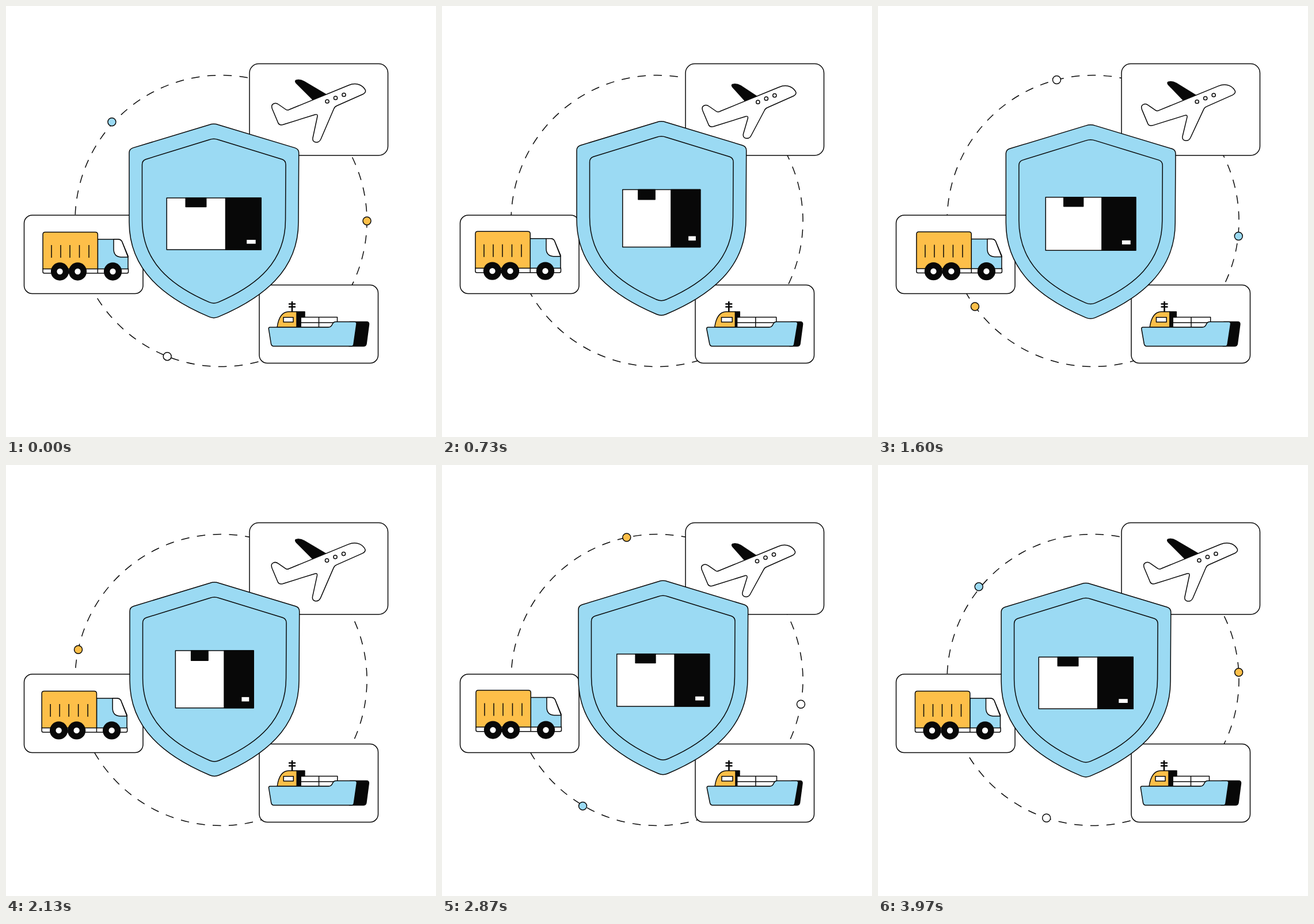
Write an HTML page that moves like this. It is 747 px wide and 750 px high and loops after 4010 ms.

```html
<!DOCTYPE html>
<html lang="en">
<head>
<meta charset="utf-8">
<title>Shipping protection</title>
<style>
html, body { margin: 0; width: 100%; height: 100%; overflow: hidden; background: #fff; }
svg { display: block; width: 747px; height: 750px; }
svg * { vector-effect: non-scaling-stroke; }
.line { fill: none; stroke: #080808; stroke-width: 1.5; stroke-linejoin: round; }
.white { fill: #fff; }
.blue { fill: #9bdaf3; }
.gold { fill: #fdbf49; }
.ink { fill: #080808; }
</style>
</head>
<body>
<svg viewBox="0 0 747 750">
  <circle id="ring" class="line" cx="373.5" cy="374" r="253.5" pathLength="57" stroke-dasharray=".52 .48"/>
  <g class="line">
    <circle id="goldDot" class="gold" r="7"/>
    <circle id="whiteDot" class="white" r="7"/>
    <circle id="blueDot" class="blue" r="7"/>
  </g>

  <g class="line">
    <rect class="white" x="423" y="100.5" width="240.5" height="159.5" rx="16"/>
    <rect class="white" x="31.5" y="364" width="206.5" height="136.5" rx="14"/>
    <rect class="white" x="440" y="485.5" width="206.5" height="136" rx="14"/>
  </g>

  <g id="plane" class="line">
    <path id="farWing" class="ink"/>
    <path id="fuselage" class="white"/>
    <g id="windows">
      <circle class="white" cx="558" cy="166" r="3.1"/>
      <circle class="white" cx="572.5" cy="160" r="3.1"/>
      <circle class="white" cx="587" cy="154.5" r="3.1"/>
    </g>
  </g>

  <g id="truck" class="line">
    <g id="chassis"><rect class="white" x="64.5" y="456" width="148.5" height="9" rx="2.5"/><path d="M159.8 456V465"/></g>
    <g id="body">
      <path class="blue" d="M159.8 406H195Q200 406 202 410L212.5 435V457.5H159.8Z"/>
      <path class="white" d="M187.5 406H195Q200 406 202 410L212.5 437H200Q187.5 436 187.5 423Z"/>
      <path class="gold" d="M64.5 457.5V397.5Q64.5 393.5 68.5 393.5H155.5Q159.8 393.5 159.8 397.5V457.5Z"/>
      <path d="M79.5 416V438M95.5 416V438M111.5 416V438M128 416V438M144.5 416V438"/>
    </g>
    <g id="wheels" class="white" style="stroke-width:10.5">
      <circle cx="94" cy="462" r="10.4"/>
      <circle cx="125" cy="462" r="10.4"/>
      <circle cx="186" cy="462" r="10.4"/>
    </g>
  </g>

  <g class="line">
    <path id="cargo" class="white"/>
    <path id="funnel" class="ink"/>
    <path id="cabin" class="gold"/>
    <path id="cabinWindow" class="white"/>
    <path id="mast" style="stroke-width:2.6"/>
    <path id="bow" class="ink"/>
    <path id="hull" class="blue"/>
  </g>

  <g id="shield" class="line">
    <path class="blue" d="M214 376V256Q214 249 220.5 247L353 206.8Q361 204 369 206.8L502 247Q508.700 249 508.700 256L508 376C508 460 447 508 369 541Q361 544.500 353 541C275 508 214 460 214 376Z"/>
    <path d="M236.500 372V276Q236.500 269 243 266.800L353 232.800Q361 229.800 369 232.800L479.500 266.800Q486 269 486 276L485.500 372C485.500 445 437 486 369 515.500Q361 519 353 515.500C285 486 236.500 445 236.500 372Z"/>
  </g>
  <g id="box" class="line">
    <rect class="white" x="-82" y="-90" width="164" height="90"/>
    <rect class="ink" x="20.300" y="-90" width="61.700" height="90"/>
    <rect class="ink" x="-49" y="-90" width="35.500" height="15.500"/>
    <rect class="white" x="57" y="-17" width="15.500" height="6.800" stroke="none"/>
  </g>
</svg>
<script>
const LOOP = 4010, TAU = Math.PI * 2;
const el = {};
document.querySelectorAll('[id]').forEach(n => el[n.id] = n);

const put = (id, x, y, extra = '') => el[id].setAttribute('transform', `translate(${x} ${y})${extra}`);
const draw = (id, d) => el[id].setAttribute('d', d);
const cubic = x => x < .5 ? 4 * x ** 3 : 1 - 4 * (1 - x) ** 3;

// [step, degrees] for the drift of the dashes
const drift = [[0, 0], [11, -2.3], [34, -2.3], [64, -4.1], [86, -4], [98, -6.9], [120, -6.316]];
function driftAt(k) {
  const i = drift.findIndex(d => d[0] > k);
  const [a, x] = drift[i - 1], [b, y] = drift[i];
  return x + (y - x) * (k - a) / (b - a);
}

function orbit(id, start, k, cx, cy, r) {
  const a = (start + 3 * k) * Math.PI / 180;
  put(id, cx + r * Math.cos(a), cy + r * Math.sin(a));
}

function drawPlane(p) {
  put('plane', -11.5 * p, 3.9 * p);
  put('windows', .5 * p, -2.5 * p);
  const x = 12.5 * p, y = 4.7 * p, up = 12 * p;
  draw('farWing', `M${533 + 4 * p} ${163 - p}L${504 + x} ${134 + y}Q${500.5 + x} ${129 + y} ${506 + x} ${128.7 + y}` +
    `Q${512 + x} ${128 + y} ${518 + x} ${131.500 + y}L${556 + p} 154Z`);
  draw('fuselage', `M462.500 179Q460 172 465 170Q469 168 473 171L486 180Q488.500 182 492 180.300L595 138` +
    `Q606 133.500 615 137.500Q622 141 624.500 147Q625 151 620 153.500L575 173.500Q571 175 569.500 179` +
    `L${547} ${231.500 - up}Q${544} ${238 - up} 538 ${237 - up}Q532 ${236 - up} 533 ${229.500 - up}` +
    `L541 192Q541.500 187.500 537 189L481 206.500Q475.500 208 473 204Z`);
}

function drawShip(p) {
  const m = (a, b) => a + (b - a) * p / .957;
  const l = m(456, 460), b = m(461, 466), c = m(604, 613), r = m(609, 619);
  const e = m(630.500, 626), f = m(626, 621.500), s = m(567, 576.500);
  draw('bow', `M${r - 12} 549.500H${e - 4}Q${e + .5} 549.500 ${e} 554L${f} 588Q${f - 1} 592 ${f - 5} 592H${c - 8}Z`);
  draw('hull', `M${l + 3} 559Q${l - .5} 559 ${l + .500} 563L${b - .500} 588Q${b + .500} 592 ${b + 4} 592` +
    `H${c - 4}Q${c - .500} 592 ${c} 588L${r} 553Q${r} 549.500 ${r - 3} 549.500H${s + 6}` +
    `Q${s + 2} 549.500 ${s} 553.500Q${s - 2} 559 ${s - 7} 559Z`);

  const w = m(471, 474), k = m(505, 510), t = m(519, 517), v = m(512, 512.500);
  draw('cabin', `M${w} 559Q${w + 4} 532 ${w + 20} 532H${k}V559Z`);
  draw('funnel', `M${k} 532H${t}V541.500H${v}V559H${k}Z`);
  const x1 = m(482, 486), x2 = m(499, 505);
  draw('cabinWindow', `M${x1} 541.800H${x2}V550H${x1}Z`);
  const a = m(497, 498.500);
  draw('mast', `M${a} 514V532M${a - 6} 518.500H${a + 6}M${a - 6} 523.500H${a + 6}`);
  const g = m(575.500, 581.500), h = m(543.500, 545);
  draw('cargo', `M${v} 541.500H${g}V559H${v}ZM${v} 551H${g}M${h} 541.500V559`);
}

function render(t) {
  // thirty steps a second, on starts rounded to 10 ms
  const rest = t % 100;
  const k = Math.min(119, Math.floor(t / 100) * 3 + (rest >= 70 ? 2 : rest >= 30 ? 1 : 0));
  const wave = c => Math.cos(TAU * (k - c) / 60);
  const p = (1 - wave(0)) / 2;

  el.ring.setAttribute('transform', `rotate(${driftAt(k) - 25.9} 373.5 374)`);
  orbit('goldDot', 0, k, 373.5, 374, 253.5);
  orbit('whiteDot', 111.6, k, 373.5, 374, 253.5);
  orbit('blueDot', 222.2, k, 372.8, 373, 255);

  drawPlane(p);
  drawShip(p);

  put('truck', -2.2 - 4.6 * wave(18.7), 0);
  put('body', 0, -1.5 * p);
  put('chassis', 0, -1.3 * p);
  put('wheels', 0, -p);

  const sx = 12 - 12 * wave(0), sy = -1.6 - 3 * wave(20);
  put('shield', sx, sy);
  const beat = k % 40 / 20;
  const q = cubic(beat < 1 ? beat : 2 - beat);
  put('box', 361.2 + sx, 424 + sy, ` scale(${1 - .178 * q} ${1 + .112 * q})`);
}

const begin = performance.now();
function tick() {
  render((performance.now() - begin) % LOOP);
  requestAnimationFrame(tick);
}
tick();
</script>
</body>
</html>
```
